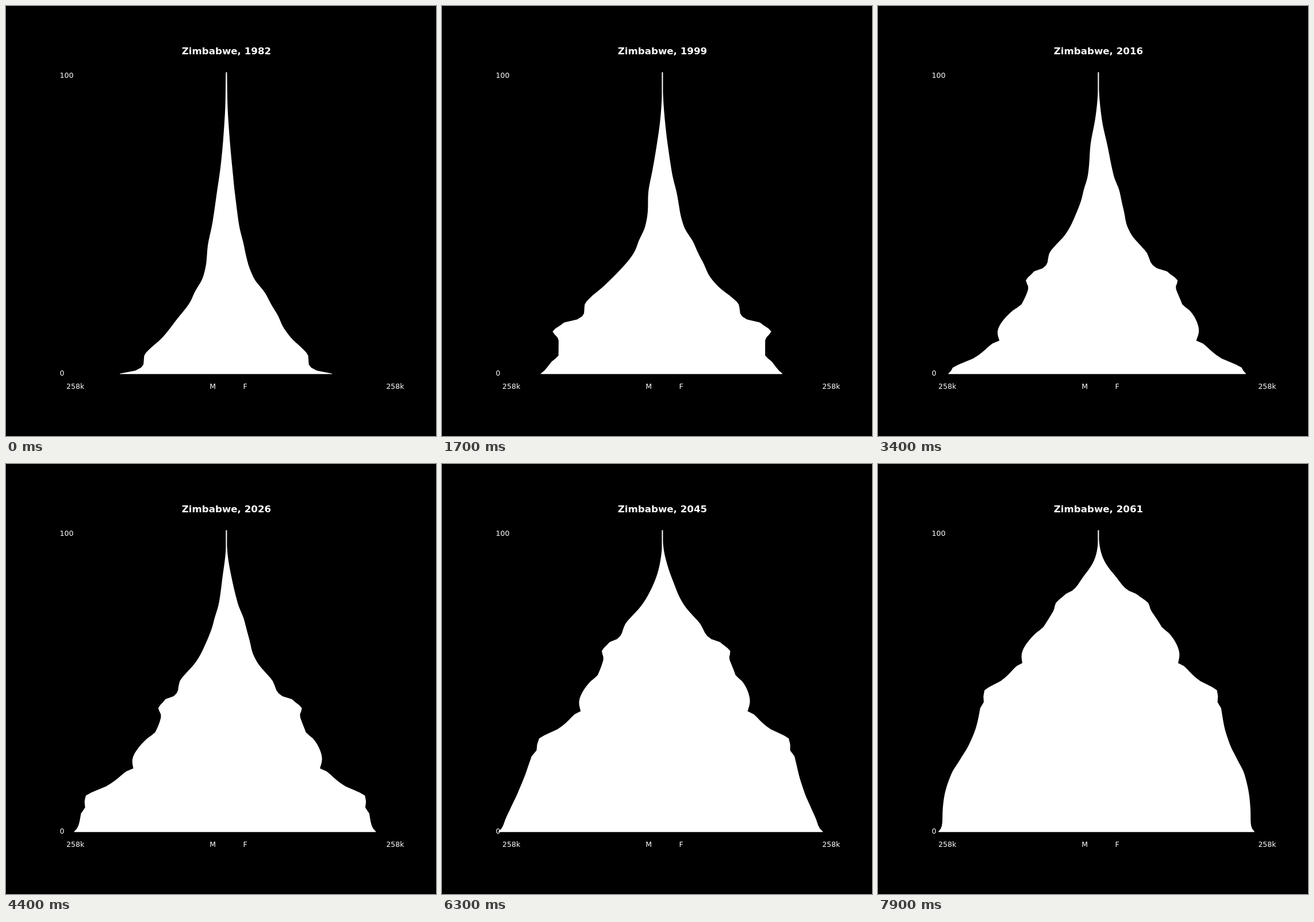
Write an HTML page that moves like this. It is 748 by 748 pixels and loops after 8000 ms.

```html
<!DOCTYPE html>
<html lang="en">
<head>
<meta charset="utf-8">
<title>Population pyramid</title>
<style>
  html, body { margin: 0; width: 100%; height: 100%; overflow: hidden; background: #000; }
  svg { display: block; width: 748px; height: 748px; fill: #fff; font: 12.5px "DejaVu Sans", sans-serif; }
  #title { font-size: 16.67px; font-weight: bold; text-anchor: middle; }
</style>
</head>
<body>
<svg viewBox="0 0 748 748">
  <path id="shape"/>
  <text id="title" x="383.4" y="84"></text>
  <text x="93.5" y="125">100</text>
  <text x="93.5" y="643">0</text>
  <text x="105.1" y="666">258k</text>
  <text x="354.3" y="666">M</text>
  <text x="412.4" y="666">F</text>
  <text x="661.4" y="666">258k</text>
</svg>
<script>
const FIRST = 1982, YEARS = 80, STEP_MS = 100;
const MID = 383.4, BASE = 639.5, ROW = 5.236, TOP_AGE = 100, MIN_WIDTH = 1;

// Men per birth year, in pixels, at birth or in the first year shown.
const cohortSize = spline([
  [1882, 1], [1892, 1.8], [1902, 4.7], [1912, 9.4], [1922, 16.7], [1932, 24.4], [1940, 32.7],
  [1945, 34.9], [1950, 40.9], [1955, 55.4], [1958, 62.4], [1964, 86.4], [1970, 111.4],
  [1974, 134.4], [1976, 142.9], [1979, 144.4], [1980, 148.4], [1981, 158.4], [1982, 185.4],
  [1983, 193], [1985, 207], [1987, 197.5], [1988, 195.4], [1993, 195.4], [1995, 204.5],
  [1998, 210.3], [2002, 214], [2005, 212], [2006, 230], [2009, 240], [2011, 247], [2013, 260],
  [2016, 261], [2018, 258.3], [2020, 264.4], [2026, 265], [2032, 269], [2037, 277],
  [2042, 284.6], [2047, 285.5], [2053, 284.3], [2061, 278.4]
]);

// Women per man, by birth year.
const sexRatio = spline([
  [1882, 1], [1902, 1.04], [1912, 1], [1922, 0.88], [1932, 0.88], [1940, 0.95], [1945, 1.06],
  [1950, 1.15], [1957, 1.21], [1961, 1.146], [1967, 1.02], [1975, 0.995], [2061, 0.975]
]);

// Yearly losses in each era: at any age, in childhood, and around a middle age
// as [rate, centre, spread] for men and women.
const eras = [
  { until: 1993, base: 0, child: 0, adult: [[0, 40, 10], [0, 40, 10]] },
  { until: 2006, base: 0.008, child: 0, adult: [[0.034, 43, 13.5], [0.025, 38, 14]] },
  { until: 2014, base: 0.008, child: 0.03, adult: [[0.035, 31, 16], [0.025, 34, 16]] },
  { until: 2061, base: 0.0025, child: 0, adult: [[0.0048, 25, 13], [0.0025, 25, 13]] }
];

// Shape-preserving cubic through the points.
function spline(pts) {
  const d = pts.slice(1).map((p, i) => (p[1] - pts[i][1]) / (p[0] - pts[i][0]));
  const n = d.length;
  const m = pts.map((_, i) => {
    if (i === 0) return d[0];
    if (i === n) return d[n - 1];
    const a = d[i - 1], b = d[i];
    return a * b <= 0 ? 0 : 2 * a * b / (a + b);
  });
  return x => {
    let i = pts.findIndex(p => p[0] > x) - 1;
    if (i < 0) i = n - 1;
    const h = pts[i + 1][0] - pts[i][0], s = (x - pts[i][0]) / h, r = 1 - s;
    return pts[i][1] * r * r * (1 + 2 * s) + pts[i + 1][1] * s * s * (3 - 2 * s)
      + h * s * r * (m[i] * r - m[i + 1] * s);
  };
}

// Share lost in the year before the given one; sex 0 is male, 1 is female.
function loss(age, year, sex) {
  const { base, child, adult } = eras.find(e => year <= e.until);
  const [rate, centre, spread] = adult[sex];
  const slope = 0.073 + 0.0006 * (year - FIRST);
  const old = (sex ? 0.084 : 0.098) * Math.exp(slope * (age - 83));
  const infant = 0.023 * Math.exp(-age / 1.3);
  return base + old + infant + child * Math.exp(-age / 5)
    + rate * Math.exp(-(((age - centre) / spread) ** 4));
}

function halfWidth(year, age, sex) {
  const born = year - age;
  let size = cohortSize(born) * (sex ? sexRatio(born) : 1);
  for (let y = Math.max(born, FIRST) + 1; y <= year; y++)
    size *= Math.exp(-loss(y - 0.5 - born, y, sex));
  return Math.max(size, MIN_WIDTH);
}

function outline(year) {
  const edge = sex => {
    const pts = [];
    for (let age = 0; age <= TOP_AGE; age++)
      pts.push([MID + (sex ? 1 : -1) * halfWidth(year, age, sex), BASE - age * ROW]);
    return [[pts[0][0], BASE + 0.7], ...pts, [pts[TOP_AGE][0], pts[TOP_AGE][1] - 0.7]];
  };
  const ring = [...edge(0), ...edge(1).reverse()];
  return "M" + ring.map(p => p.map(v => v.toFixed(2)).join(" ")).join("L") + "Z";
}

const shape = document.getElementById("shape"), title = document.getElementById("title");
let shown;

function draw() {
  const year = FIRST + Math.floor(performance.now() / STEP_MS) % YEARS;
  if (year !== shown) {
    shown = year;
    shape.setAttribute("d", outline(year));
    title.textContent = "Zimbabwe, " + year;
  }
  requestAnimationFrame(draw);
}
draw();
</script>
</body>
</html>
```
